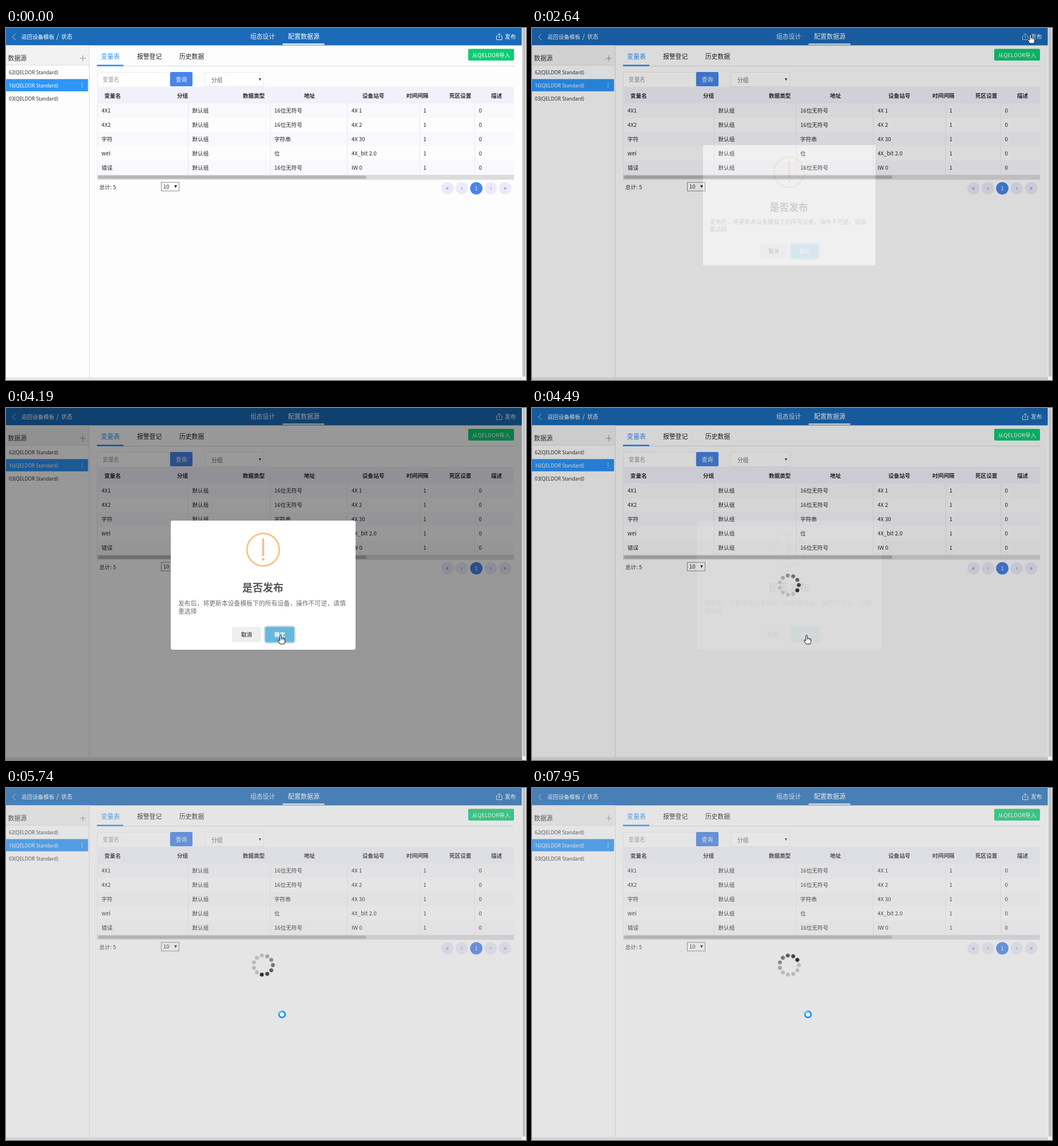
An HTML page that plays this animation: 909 px wide and 616 px high, repeating every 8 s.

```html
<!DOCTYPE html>
<html lang="zh">
<head>
<meta charset="utf-8">
<title>配置数据源</title>
<style>
html, body { margin: 0; width: 100%; height: 100%; overflow: hidden; background: #fdfdfd; }
svg { display: block; width: 909px; height: 616px; }
text { font-family: "Noto Sans CJK SC", "Noto Sans CJK", "Noto Sans", sans-serif; white-space: pre; }
.latin { font-family: "Noto Sans", "Open Sans", sans-serif; }
.anim { animation: 8s infinite; }
.step { animation: 8s step-end infinite; }

/* confirm dialog */
#veil { animation: veil 8s infinite, veilShown 8s step-end infinite; }
#modal { transform-origin: 449.5px 310px; animation: pop 8s infinite, modalFade 8s infinite; }
#ring { animation-name: pulse; }
#ok { animation-name: press; }
@keyframes veilShown { 0% { visibility: hidden } 33% { visibility: visible } 59%, 100% { visibility: hidden } }
@keyframes veil {
  0%, 32.2% { opacity: 0 }
  35.95% { opacity: 1 }
  56.12% { opacity: 1; animation-timing-function: step-end }
  56.125% { opacity: .4; animation-timing-function: ease-out }
  58.5%, 100% { opacity: 0 }
}
@keyframes modalFade {
  0%, 32.15% { opacity: 0 }
  34.65% { opacity: 1 }
  56.12% { opacity: 1; animation-timing-function: step-end }
  56.125% { opacity: .16; animation-timing-function: ease-out }
  57.2%, 100% { opacity: 0 }
}
@keyframes pop {
  0%, 32.21% { transform: scale(.5) }
  33.86% { transform: scale(1.05) }
  35.17% { transform: scale(.95) }
  35.92%, 100% { transform: scale(1) }
}
@keyframes pulse { 0%, 32.15% { stroke: #f8d486 } 41.5%, 100% { stroke: #f9c284 } }
@keyframes press { 0% { fill: #7cd1f9 } 45.625% { fill: #78cbf2 } 52.375%, 100% { fill: #66b9dc } }

/* waiting layer */
#wait { animation: wait 8s linear infinite; }
#spin { animation-name: waitShown; }
#dots { transform-origin: 449.6px 309.9px; animation: spin 8s infinite; }
@keyframes wait { 0%, 56.125% { opacity: 0 } 61.125%, 100% { opacity: 1 } }
@keyframes waitShown { 0% { visibility: hidden } 56.125%, 100% { visibility: visible } }
@keyframes spin {
  0% { transform: rotate(calc(360deg / 11)); animation-timing-function: step-end }
  57.125% { transform: rotate(calc(360deg * 2 / 11)); animation-timing-function: steps(12) }
  71.625% { transform: rotate(calc(360deg * 14 / 11)); animation-timing-function: steps(29) }
  99.25%, 100% { transform: rotate(calc(360deg * 43 / 11)) }
}

/* pointer */
#pointer { animation: travel 8s linear infinite; }
#arrow { animation-name: arrow; }
#hand { animation-name: hand; }
#busy { animation-name: busy; }
#share { animation-name: hover; }
@keyframes travel {
  0%, 2.75% { transform: translate(858px, 590px) }
  5% { transform: translate(868px, 455px) }
  7.5% { transform: translate(873px, 270px) }
  10% { transform: translate(865px, 95px) }
  12.6% { transform: translate(853px, 18px) }
  13.375% { transform: translate(861px, 15px) }
  14.375%, 16.37% { transform: translate(870px, 12px) }
  16.375%, 35.75% { transform: translate(871px, 11px) }
  39% { transform: translate(690px, 205px) }
  42.375% { transform: translate(532px, 348px) }
  45.625% { transform: translate(498px, 385px) }
  48.25%, 100% { transform: translate(480px, 397px) }
}
@keyframes arrow {
  0% { visibility: hidden } 2.75% { visibility: visible } 13.375% { visibility: hidden }
  36.25% { visibility: visible } 45.625%, 100% { visibility: hidden }
}
@keyframes hand {
  0% { visibility: hidden } 13.375% { visibility: visible } 36.25% { visibility: hidden }
  45.625% { visibility: visible } 58.75%, 100% { visibility: hidden }
}
@keyframes busy { 0% { visibility: hidden } 58.75%, 100% { visibility: visible } }
@keyframes hover { 0% { opacity: 1 } 20.375% { opacity: .75 } 36.25%, 100% { opacity: 1 } }
</style>
</head>
<body>
<svg viewBox="0 0 909 616" xmlns="http://www.w3.org/2000/svg">
  <g id="page"></g>

  <g id="top" fill="none" stroke="#fff" stroke-width="1">
    <path d="M17 10 11 15.500 17 21" stroke="#a9cdf0"/>
    <path id="share" class="step" d="M859.500 14H857.500V20.500H867V14H865M862.200 18V9.800M859.500 12.300 862.200 9.600 865 12.300" stroke="#dcebfa"/>
    <path d="M129 53H139.500M134.200 47.800V58.200" stroke="#7d95b0"/>
  </g>

  <g id="veil">
    <rect width="902" height="616" fill="#000" fill-opacity=".4"/>
    <g id="modal">
      <rect x="288" y="197" width="323" height="226" rx="3.400" fill="#fff"/>
      <circle id="ring" class="anim" cx="449.500" cy="248" r="28.300" fill="none" stroke-width="2.700"/>
      <rect x="447.900" y="228" width="3.300" height="31.500" rx="1.400" fill="#f8bb86"/>
      <circle cx="449.500" cy="264.800" r="2.400" fill="#f8bb86"/>
      <rect x="395" y="383" width="51" height="27" rx="3.400" fill="#efefef"/>
      <rect x="451.700" y="381.700" width="53.600" height="29.600" rx="4.500" fill="none" stroke="#2b72a5" stroke-opacity=".35" stroke-width="1.400"/>
      <rect id="ok" class="step" x="453" y="383" width="51" height="27" rx="3.400"/>
    </g>
  </g>

  <rect id="wait" width="902" height="616" fill="#adadad" fill-opacity=".3"/>
  <g id="spin" class="step"><g id="dots"></g></g>

  <g id="pointer">
    <path id="arrow" class="step" d="M0 0V16L3.700 12.600 6.200 18.300 8.600 17.200 6.100 11.700H11.200Z" fill="#fff" stroke="#000" stroke-width=".9"/>
    <g id="hand" class="step">
      <path d="M-1.300 1.300Q0 -.5 1.300 1.300V6Q2.800 4.900 4 6.400Q5.300 5.500 6.200 7Q7.800 6.700 7.800 8.300V11.500Q7.600 13.500 6.300 16H-.8Q-2.400 13.500 -4.300 10.300Q-4.500 8.500 -2.900 8.900L-1.300 10.500Z" fill="#fff" stroke="#111" stroke-width="1" stroke-linejoin="round"/>
      <path d="M1.300 6V9M4 6.500V9.200M6.200 7.200V9.500" fill="none" stroke="#111" stroke-width=".7"/>
    </g>
  </g>
  <g id="busy" class="step" fill="none" stroke-width="3">
    <circle cx="482.500" cy="396.300" r="5.300" fill="#f4faff" stroke="#2a93f0"/>
    <path d="M477.200 396.300A5.300 5.300 0 0 1 482.500 391" stroke="#4fc3f7"/>
  </g>
</svg>

<script>
const NS = 'http://www.w3.org/2000/svg';
const $ = id => document.getElementById(id);
const page = $('page'), modal = $('modal');

function add(parent, tag, attrs) {
  const el = document.createElementNS(NS, tag);
  for (const k in attrs) el.setAttribute(k, attrs[k]);
  return parent.appendChild(el);
}
const box = (x, y, width, height, fill, more) =>
  add(page, 'rect', { x, y, width, height, fill, ...more });
const frame = (x, y, w, h, stroke) => box(x + .5, y + .5, w - 1, h - 1, '#fff', { stroke });

// cy is the optical middle of the line
function label(str, x, cy, size, fill, more, parent = page) {
  const el = add(parent, 'text', { x, y: cy + size * .37, 'font-size': size, fill, ...more });
  el.textContent = str;
}
const mid = { 'text-anchor': 'middle' };
const bold = { 'font-weight': 700 };
const medium = { 'font-weight': 500 };
const brand = 'QELDOR';

// scroll bar, page, top bar
box(0, 0, 902, 616, '#fdfdfd');
box(902, 0, 7, 616, '#f0f0f0');
box(903, 0, 5, 610, '#c1c1c1', { rx: 2 });
box(0, 611, 902, 5, '#e5e8f0');
box(0, 0, 901.6, 30.4, '#1c6bb8');
label('返回设备模板', 27, 15, 9.6, '#fff', medium);
label('/', 88, 15, 11, '#fff');
label('状态', 96.5, 15, 9.7, '#fff', medium);
label('组态设计', 427, 15, 10.8, '#e6f0fa');
label('配置数据源', 493, 15, 11, '#fff');
box(483.5, 27, 73, 2.6, '#e3eefa');
label('发布', 872, 15, 9.7, '#fff');

// sidebar
box(0, 30.4, 145, 34.6, '#f2f2f2');
box(0, 64.5, 145, 1, '#dcdcdc');
box(145, 30.4, 1, 580.6, '#dcdcdc');
label('数据源', 3.5, 53, 10.9, '#333');
box(0, 89.4, 143.4, 21.4, '#2d96f9');
['62', '16', '03'].forEach((n, i) =>
  label(`${n}(${brand} Standard)`, 5, 77.5 + 23 * i, 8.4, i === 1 ? '#fff' : '#333', { class: 'latin' }));
for (const y of [96.5, 100, 103.5]) add(page, 'circle', { cx: 133, cy: y, r: .8, fill: '#fff' });

// tabs
label('变量表', 166, 50, 11, '#2a95f5');
label('报警登记', 229, 50, 10.8, '#222');
label('历史数据', 303, 50, 10.8, '#222');
box(159, 66, 729, 1, '#dadada');
box(159, 64.3, 46, 2.7, '#2a95f5');
box(808, 36.6, 80, 20.4, '#0ccd72', { rx: 2 });
label(`从${brand}导入`, 848, 47, 9.6, '#fff', mid);

// search line
frame(159, 77, 128, 27, '#ececec');
label('变量名', 169, 90.5, 9.7, '#999');
box(287, 77, 39, 25, '#4884e9', { rx: 2 });
label('查询', 306.5, 90, 9.7, '#fff', mid);
frame(347, 77, 104, 26, '#ececec');
label('分组', 359, 91, 9.8, '#666');
add(page, 'path', { d: 'M441.800 88H446.200L444 92.500Z', fill: '#444' });

// table
const heads = { 变量名: 172, 分组: 299, 数据类型: 414, 地址: 521, 设备站号: 623, 时间间隔: 700, 死区设置: 775, 描述: 848 };
const cols = [167, 325.5, 469, 604, 729.5, 826.5];
const rows = [
  ['4X1', '16位无符号', '4X 1'],
  ['4X2', '16位无符号', '4X 2'],
  ['字符', '字符串', '4X 30'],
  ['wei', '位', '4X_bit 2.0'],
  ['错误', '16位无符号', 'IW 0']
];
box(159, 103, 729, 29, '#f1f1fb');
for (const h in heads) label(h, heads[h], 118, 9.6, '#2b2b2b', bold);
rows.forEach(([name, type, addr], i) => {
  const y = 132 + 25 * i;
  box(159, y, 729, 25, i % 2 ? '#fdfdfd' : '#f9f9fd');
  [name, '默认组', type, addr, '1', '0'].forEach((s, c) => label(s, cols[c], y + 12.3, 9.6, '#262626'));
});
for (const x of [159, 318, 461.5, 596, 722.5, 819]) box(x, 132, 1, 125, '#e9e9f1');
box(159, 257, 729, 8.5, '#dcdcdc');
box(161, 258.2, 469, 5.6, '#b6b6b6', { rx: 2.8 });

// table foot
label('总计: 5', 163, 278.7, 9.6, '#333');
frame(271, 269.6, 32, 16, '#8a8a8a');
label('10', 275, 278, 9.4, '#222');
add(page, 'path', { d: 'M294 275.200H299L296.500 280Z', fill: '#222' });
['«', '‹', '1', '›', '»'].forEach((s, i) => {
  const x = 771.7 + 25.2 * i, on = i === 2;
  add(page, 'circle', { cx: x, cy: 280.5, r: 10.8, fill: on ? '#4884e9' : '#ebebf8' });
  label(s, x, on ? 280.5 : 279.5, on ? 9 : 11, on ? '#fff' : '#5a72c4', mid);
});

// dialog text
label('是否发布', 449, 314, 18, '#595959', { ...mid, ...bold }, modal);
label('发布后，将更新本设备模板下的所有设备，操作不可逆，请慎', 301, 341.5, 10.85, '#707070', {}, modal);
label('重选择', 301, 355.5, 10.85, '#707070', {}, modal);
label('取消', 420.5, 396.7, 9.5, '#555', { ...mid, ...bold }, modal);
label('确定', 478.5, 396.7, 9.5, '#fff', { ...mid, ...bold }, modal);

// spinner: dark head, tail fading backwards
for (let i = 0; i < 11; i++) {
  const a = -i * 2 * Math.PI / 11, v = Math.min(185, 42 + 24 * i);
  add($('dots'), 'circle', {
    cx: 449.6 + 16.9 * Math.cos(a), cy: 309.9 + 16.9 * Math.sin(a), r: 3.4, fill: `rgb(${v},${v},${v})`
  });
}
</script>
</body>
</html>
```
